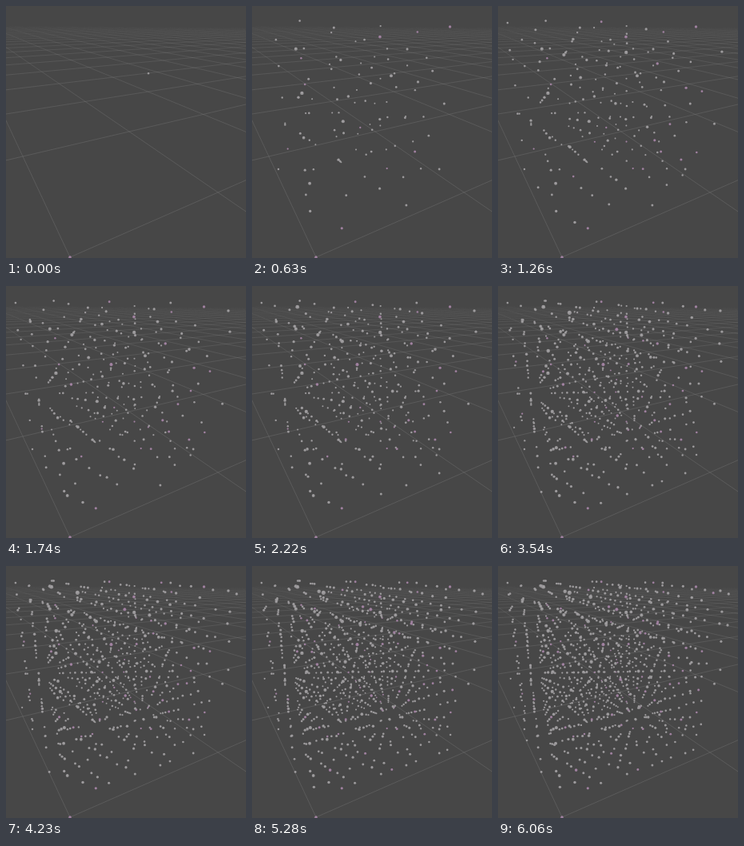
Write an HTML page with a canvas that moves like this. It is 300 px wide and 315 px high and loops after 6090 ms.

```html
<!DOCTYPE html>
<html lang="en">
<head>
<meta charset="utf-8">
<title>Quasirandom points in a cube</title>
<style>
  html, body { margin: 0; width: 100%; height: 100%; overflow: hidden; background: #474747; }
  canvas { display: block; }
</style>
</head>
<body>
<canvas id="stage" width="300" height="315"></canvas>
<script>
const W = 300, H = 315, LOOP = 6090, STEP = 30;
const PER_STEP = 5, STEPS = LOOP / STEP - 2;
const PLASTIC = 1.2207440846057596;
const stage = document.getElementById('stage').getContext('2d');

// Perspective view of a floor (u, v) with height w; one floor cell is one unit.
function project(u, v, w) {
  const d = 1 + 0.3718 * u + 0.7013 * v - 0.338 * w;
  return {
    x: (80 + 283.5 * u - 44.27 * v - 40.8 * w) / d,
    y: (314 + 5.63 * u + 5.84 * v - 296 * w) / d,
    d
  };
}

// Additive sequence built on powers of the plastic number.
function makePoint(n) {
  const axis = power => (n / PLASTIC ** power) % 1;
  const p = project(axis(1), axis(3), axis(2));
  p.r = 1.8 / p.d;
  p.n = n;
  p.pink = (Math.sin(n * 12.9898) * 43758.5453 % 1 + 1) % 1 < 0.09;
  return p;
}

function segment(g, a, b) {
  if (a.d < 0.05 || b.d < 0.05) return;
  const alpha = 0.22 * (1 - (a.d + b.d) / 40);
  if (alpha <= 0) return;
  g.strokeStyle = `rgba(190,190,190,${alpha})`;
  g.beginPath();
  g.moveTo(a.x, a.y);
  g.lineTo(b.x, b.y);
  g.stroke();
}

function makeFloor() {
  const canvas = document.createElement('canvas');
  canvas.width = W;
  canvas.height = H;
  const g = canvas.getContext('2d');
  g.fillStyle = '#474747';
  g.fillRect(0, 0, W, H);
  g.lineWidth = 0.8;
  for (let i = -3; i < 40; i++) {
    for (let j = -3; j < 30; j++) {
      const p = project(i, j, 0);
      segment(g, p, project(i + 1, j, 0));
      segment(g, p, project(i, j + 1, 0));
    }
  }
  return canvas;
}

function ball(g, p) {
  g.fillStyle = p.pink ? '#9a7c9a' : '#969496';
  g.beginPath();
  g.arc(p.x, p.y, p.r, 0, Math.PI * 2);
  g.fill();
  g.fillStyle = p.pink ? '#a688a6' : '#a3a1a3';
  g.beginPath();
  g.arc(p.x, p.y - p.r * 0.2, p.r * 0.5, 0, Math.PI * 2);
  g.fill();
}

const floor = makeFloor();
const points = Array.from({ length: 2 + PER_STEP * STEPS }, (_, n) => makePoint(n))
  .sort((p, q) => q.d - p.d);

function draw(now) {
  const step = Math.max(0, Math.floor((now % LOOP) / STEP) - 1);
  const count = 2 + PER_STEP * step;
  stage.drawImage(floor, 0, 0);
  for (const p of points) if (p.n < count) ball(stage, p);
}

const start = performance.now();
function tick() {
  draw(performance.now() - start);
  requestAnimationFrame(tick);
}
tick();
</script>
</body>
</html>
```
